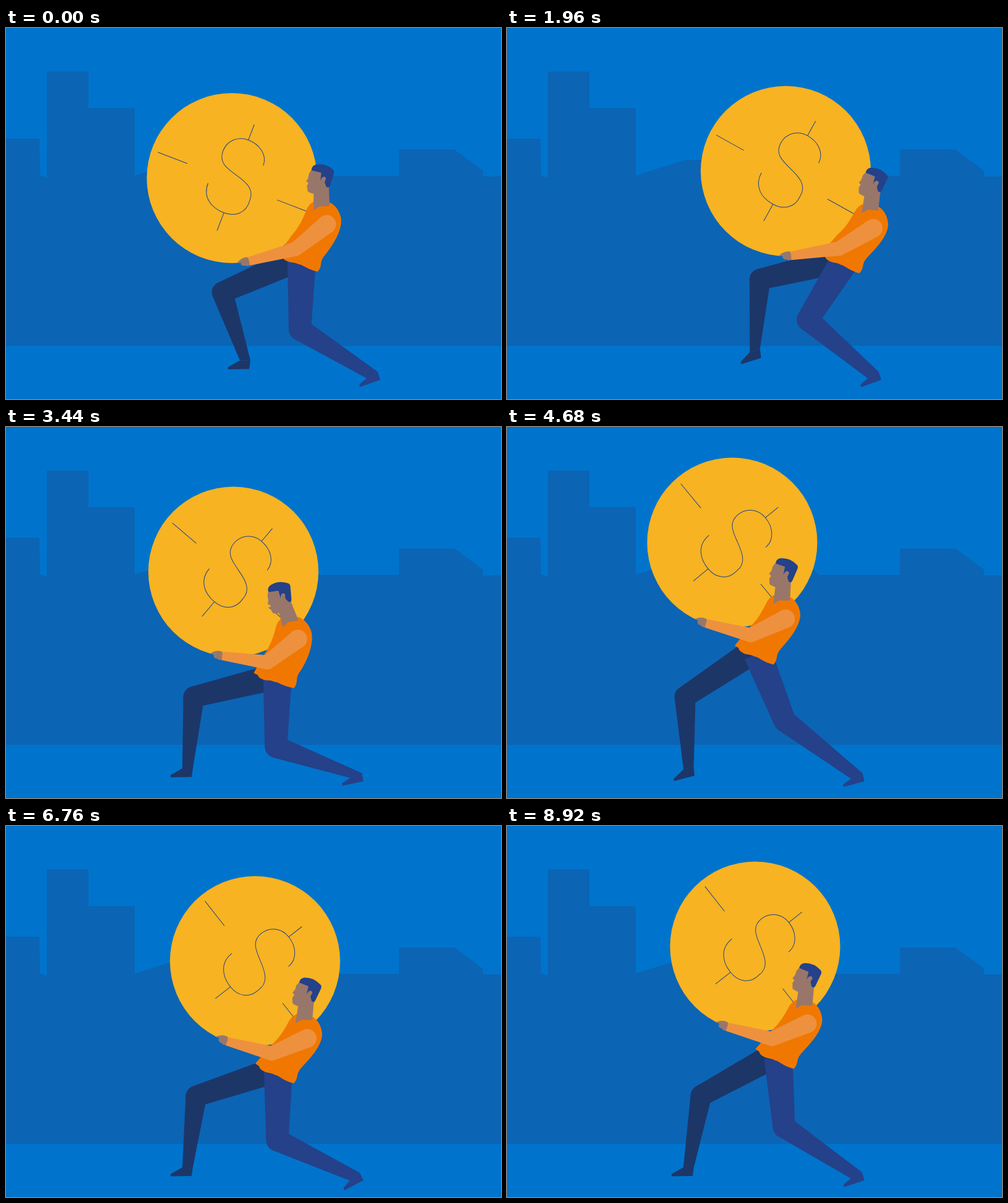
These frames come from a looping animation (800x600 px, 9520 ms). An HTML page with a canvas:

```html
<!DOCTYPE html>
<html lang="en">
<head>
<meta charset="utf-8">
<title>Heavy coin</title>
<style>
  html, body { margin: 0; width: 100%; height: 100%; overflow: hidden; background: #0074cc; }
  canvas { display: block; width: 800px; height: 600px; }
</style>
</head>
<body>
<canvas id="stage" width="800" height="600"></canvas>
<script>
const ctx = document.getElementById('stage').getContext('2d');
const LOOP = 9520, STEP = 40, RAD = Math.PI / 180;
const C = {
  sky: '#0074cc', city: '#0c64b4', coin: '#f7b322', navy: '#24418a',
  dark: '#1c3668', shirt: '#f07800', sleeve: '#ee913f', skin: '#98776a'
};

// Key poses: time, coin x, coin y, torso lean. Everything else follows from these.
const POSES = [
  [80, 365, 242.7, -6.4],
  [560, 326, 262, -8],
  [1960, 450.5, 231.3, 0.5],
  [2400, 515, 145, 7],
  [2960, 364, 222, -10],
  [3440, 367.5, 234, -13.4],
  [4680, 364, 187, -2],
  [5000, 350.5, 188.5, -1.5],
  [5640, 402.3, 215, 0],
  [6300, 401.5, 220, 0],
  [7720, 405.5, 210, 0],
  [8920, 401, 195, 0]
];

const clamp = (v, lo, hi) => Math.min(hi, Math.max(lo, v));
const smooth = u => u * u * (3 - 2 * u);
const ease = (t, from, to) => smooth(clamp((t - from) / (to - from), 0, 1));
const bump = (t, mid, half) => smooth(Math.max(0, 1 - Math.abs(t - mid) / half));

// Smooth interpolation that never overshoots a key.
function slope(k, i, c) {
  if (i === 0 || i === k.length - 1) return 0;
  const a = (k[i][c] - k[i - 1][c]) / (k[i][0] - k[i - 1][0]);
  const b = (k[i + 1][c] - k[i][c]) / (k[i + 1][0] - k[i][0]);
  return a * b <= 0 ? 0 : Math.sign(a) * Math.min(Math.abs(a + b) / 2, 3 * Math.abs(a), 3 * Math.abs(b));
}

function sample(k, time) {
  const t = clamp(time, k[0][0], k[k.length - 1][0]);
  let i = 0;
  while (i < k.length - 2 && t >= k[i + 1][0]) i++;
  const d = k[i + 1][0] - k[i][0], u = (t - k[i][0]) / d, v = 1 - u;
  return k[i].slice(1).map((p, n) => {
    const c = n + 1;
    return p * smooth(v) + k[i + 1][c] * smooth(u)
      + d * u * v * (v * slope(k, i, c) - u * slope(k, i + 1, c));
  });
}

function turn(x, y, deg) {
  const c = Math.cos(deg * RAD), s = Math.sin(deg * RAD);
  return [x * c - y * s, x * s + y * c];
}

const add = (p, q) => [p[0] + q[0], p[1] + q[1]];
const shift = (p, v, k) => [p[0] + v[0] * k, p[1] + v[1] * k];

// Unit vector from a to b, its normal and the distance.
function axis(a, b) {
  const x = b[0] - a[0], y = b[1] - a[1], d = Math.hypot(x, y);
  return { u: [x / d, y / d], n: [-y / d, x / d], d };
}

// Turns a rest-pose path into a posed one.
function posed(d, fn) {
  return new Path2D(d.replace(/(-?[\d.]+) (-?[\d.]+)/g,
    (m, x, y) => fn(+x, +y).map(n => n.toFixed(2)).join(' ')));
}

function fill(path, color) {
  ctx.fillStyle = color;
  ctx.fill(path);
}

function poly(points, color) {
  fill(new Path2D('M' + points.map(p => p.join(' ')).join('L') + 'Z'), color);
}

function disc([x, y], r, color) {
  ctx.beginPath();
  ctx.arc(x, y, r, 0, 7);
  ctx.fillStyle = color;
  ctx.fill();
}

function knee(hip, ankle, thigh, calf) {
  const { u, n, d } = axis(hip, ankle);
  const s = 1 + Math.max(0, d - 215) * 0.0016;
  const a = thigh * s, b = calf * s;
  const along = (a * a - b * b + d * d) / (2 * d);
  return shift(shift(hip, u, along), n, Math.sqrt(Math.max(0, a * a - along * along)));
}

// Two tapered segments; the far end closes on the given pair of corners.
function limb(root, joint, corners, rootR, jointR, color) {
  const mid = [(corners[0][0] + corners[1][0]) / 2, (corners[0][1] + corners[1][1]) / 2];
  const a = axis(root, joint).n, b = axis(joint, mid).n;
  poly([shift(root, a, rootR), shift(joint, a, jointR), shift(joint, a, -jointR), shift(root, a, -rootR)], color);
  poly([shift(joint, b, jointR), corners[0], corners[1], shift(joint, b, -jointR)], color);
  disc(joint, jointR, color);
}

const city = new Path2D('M0 179H54L55 238L66 242V70.5H133.5V129.5H208V238.5L290 213H478L504 239H635V196.5H725L771 231V240H800V514H0Z');
const marks = new Path2D('M40.3 -37C40 -56 22 -67 3 -67C-15 -67 -29 -54 -29 -36C-29 -15 -12 -12 5 -7C24 -2 41 4 40 24C42 45 27 57 8 57C-14 57 -33 46 -33 21.5M3 -94V-67M8 57V88M-126.4 3.6H-75.4M81 7H131');
const SHIRT = 'M468 281Q460 284 455 293C448 306 440 320 427 331L401 361L407 365Q408 370 414 373C420 377 426 375 432 379C441 381 445 388 463 393Q468 388 469 380Q470 373 477 366C490 352 509 332 509 313C508 301 503 292 495 286Z';
const FACE = 'M473 228L467 235Q466 242 461 246L464 250L461 254L461 263Q465 267 473 269L480 272L496 262L495 238Z';
const HAIR = 'M472 230Q473 223 480 222Q495 221 506 233Q509 236 507 240L498 259Q496 263 492 260L490 252L484 248L487 236Z';
const EAR = 'M484 249Q486 243 491 243Q495 246 492 249Q490 251 490 255L485 256Z';
const HAND = 'M336 317L344 315Q352 314 357 318L355 331L349 330L346 327L343 326L341 321L345 320Z';

function pose(t) {
  const [cx, cy, lean] = sample(POSES, t);
  const spin = 20.9 + 19.3 * ease(t, 1000, 3150) + 11.6 * ease(t, 3440, 5000);
  const reach = 164 + 0.38 * spin - 0.6 * lean;
  const hip = add([cx, cy], turn(reach, 0, 31 + 0.912 * spin));

  const lift = bump(t, 2350, 600), stride = ease(t, 2250, 2950), slide = ease(t, 2400, 2960);
  return {
    coin: [cx, cy], spin, hip, lean,
    nod: lean * (1 + 0.007 * lean * lean),
    ankle: [386 - 93 * stride + 50 * lift, 537.5 + 14.5 * stride - 55 * lift],
    tilt: -24 * bump(t, 2250, 800) - 14 * bump(t, 4800, 1100),
    heel: [605 - 27.3 * slide, 569 + 4 * slide],
    pitch: clamp(0.4 * (375 - hip[1]), -12, 4) + 19 * bump(t, 3300, 1200)
  };
}

function draw(t) {
  const { coin, spin, hip, lean, nod, ankle, tilt, heel, pitch } = pose(t);

  // The hem follows the lean less than the shoulders do.
  const torso = (x, y) => {
    const w = 1 - 0.5 * clamp((y - 330) / 25, 0, 1);
    return add(hip, turn(x - 438, y - 375, lean * w));
  };
  const neck = torso(482, 285);
  const head = (x, y) => add(neck, turn(x - 482, y - 285, nod));
  const held = (x, y) => add(coin, turn(x - 401, y - 195, spin - 52));
  const front = (x, y) => add(ankle, turn(x, y, tilt));
  const rear = (x, y) => add(heel, turn(x, y, pitch));

  ctx.fillStyle = C.sky;
  ctx.fillRect(0, 0, 800, 600);
  fill(city, C.city);

  disc(coin, 137.5, C.coin);
  ctx.save();
  ctx.translate(...coin);
  ctx.rotate(spin * RAD);
  ctx.strokeStyle = C.navy;
  ctx.stroke(marks);
  ctx.restore();

  const frontHip = add(hip, [-10, -2]);
  limb(frontHip, knee(frontHip, ankle, 129, 116), [front(-8, 0), front(9, 0)], 21, 17, C.dark);
  poly([front(-8, 0), front(-27, 11), front(-27, 14.5), front(7, 14), front(9, 0)], C.dark);

  limb(hip, knee(hip, rear(-12, -10), 110, 138), [rear(-22, -3), rear(-4, -13)], 23, 18, C.navy);
  poly([rear(0, 0), rear(-33, 11), rear(-34, 7), rear(-22, -3), rear(-4, -13)], C.navy);

  fill(posed(SHIRT, torso), C.shirt);
  poly([head(471, 262), torso(466, 296), torso(476, 290), torso(493, 291), head(496, 258)], C.skin);
  fill(posed(FACE, head), C.skin);
  fill(posed(HAIR, head), C.navy);
  fill(posed(EAR, head), C.skin);

  // The elbow sags less as the arm stretches.
  const shoulder = torso(485, 320);
  const { u, n, d } = axis(shoulder, held(356, 324.5));
  const sag = Math.max(4, 22.5 - 0.85 * (d - 129));
  const elbow = shift(shift(shoulder, u, d * 0.45), n, -sag);
  fill(posed(HAND, held), C.skin);
  disc(shoulder, 15, C.sleeve);
  limb(shoulder, elbow, [held(358, 318), held(353, 331)], 15, 11.5, C.sleeve);
}

const start = performance.now();
function tick() {
  const t = (performance.now() - start) % LOOP;
  draw(Math.floor(t / STEP) * STEP);
  requestAnimationFrame(tick);
}
tick();
</script>
</body>
</html>
```
